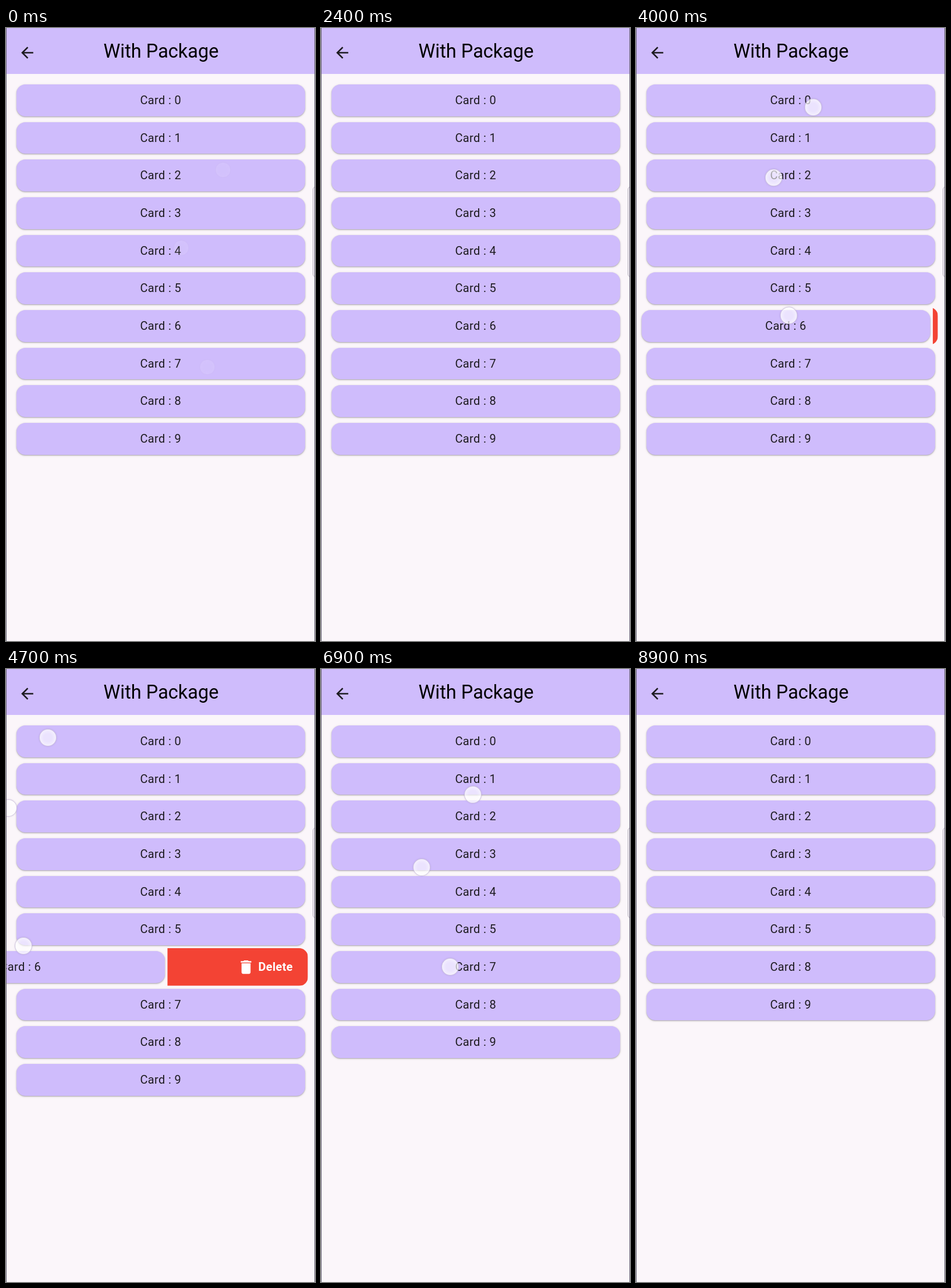
Write an HTML page that moves like this. It is 531 px wide and 1054 px high and loops after 9 s.

```html
<!DOCTYPE html>
<html lang="en">
<head>
<meta charset="utf-8">
<title>With Package</title>
<style>
  html, body { margin: 0; width: 100%; height: 100%; overflow: hidden; }
  #stage {
    position: relative; width: 531px; height: 1054px; overflow: hidden;
    background: #fbf6fa; color: #1d1b20;
    font: 20px/26px Roboto, sans-serif; letter-spacing: .35px;
  }
  #stage::after {
    content: ""; position: absolute; inset: 0; pointer-events: none;
    border: solid #6c667a; border-width: 0 1px;
  }
  header { position: absolute; width: 100%; height: 78.5px; background: #cfbcfc; }
  h1 {
    position: absolute; left: 1px; top: 20px; width: 100%; margin: 0;
    font: 32.5px/40px Roboto, sans-serif; letter-spacing: 0; text-align: center; color: #000;
  }
  svg { width: 31px; height: 31px; fill: currentColor; }
  header svg { position: absolute; left: 20.5px; top: 27px; }
  #list { position: absolute; left: 13px; top: 92px; width: 505.5px; }
  .row { position: relative; height: 64.67px; }
  .card {
    position: absolute; left: 5px; right: 5px; top: 5px; height: 54.7px;
    border-radius: 15.5px; background: #cfbcfc; text-align: center; line-height: 54px;
    box-shadow: 0 1px 2px rgba(0,0,0,.26), 0 1px 4px rgba(0,0,0,.12);
  }
  .action {
    position: absolute; left: 0; right: 0; top: 50%; height: 64.67px; margin-top: -32.33px;
    box-sizing: border-box; padding: 0 25.5px; border-radius: 15.5px;
    display: flex; align-items: center; gap: 5.5px; color: #fff; font-weight: 700;
  }
  .edit { background: #4bae4f; }
  .delete { background: #f34334; justify-content: flex-end; }
  .dot {
    position: absolute; left: -15px; top: -15px; width: 30px; height: 30px;
    box-sizing: border-box; border-radius: 50%; border: 1.5px solid rgba(145,125,180,.42);
    background: radial-gradient(rgba(255,255,255,.58) 35%, rgba(255,255,255,.8) 75%);
    box-shadow: 0 0 3px rgba(100,80,140,.2);
  }
  #edge {
    position: absolute; left: 527px; top: 272px; width: 12px; height: 155px;
    border: 1px solid #b9b4bf; border-radius: 6px; background: #f1edf3;
  }
</style>
</head>
<body>
<div id="stage">
  <header>
    <svg viewBox="0 0 24 24"><path d="M20 11H7.83l5.59-5.59L12 4l-8 8 8 8 1.41-1.41L7.83 13H20z"/></svg>
    <h1>With Package</h1>
  </header>
  <div id="list"></div>
  <div id="edge"></div>
</div>
<script>
const LOOP = 9000, STEP = 100;
const WIDTH = 505.5, ROW = 64.67;
const SLIDE = 200, FADE = 200, PAUSE = 120, COLLAPSE = 180;

// path: [ms, x, y] of the lowest finger; others: offsets of the other two fingers;
// target: where the card settles after release
const drags = [
  { row: 6, target: 0, others: [[-45, -205], [27, -339]],
    path: [[-175, 346, 583]] },
  { row: 6, target: 0, others: [[-28, -220], [35, -350]],
    path: [[400, 269.5, 520], [850, 380, 512], [1500, 241, 506], [1700, 185, 503], [1850, 205, 503]] },
  { row: 6, target: 0, others: [[-4, -214], [51, -340]],
    path: [[3000, 240, 502], [3300, 279, 496], [3500, 325, 494], [3700, 270, 495]] },
  { row: 6, target: -WIDTH, others: [[-26, -237], [42, -358]],
    path: [[3900, 271, 495], [4700, 30, 476], [5200, 42, 478], [5700, 28, 480]] },
  { row: 7, target: WIDTH, others: [[-49, -171], [39, -296]],
    path: [[6900, 222, 512], [7700, 451, 500], [7850, 480, 498]] },
];

const clamp = v => Math.min(1, Math.max(0, v));
const easeOut = u => 1 - (1 - u) ** 2;
const easeInOut = u => u * u * (3 - 2 * u);

function element(parent, className, html = "") {
  const el = document.createElement("div");
  el.className = className;
  el.innerHTML = html;
  return parent.appendChild(el);
}

const icon = d => `<svg viewBox="0 0 24 24"><path d="${d}"/></svg>`;
const pencil = icon("M3 17.25V21h3.75L17.81 9.94l-3.75-3.75zM20.71 7.04c.39-.39.39-1.02 0-1.41l-2.34-2.34c-.39-.39-1.02-.39-1.41 0l-1.83 1.83 3.75 3.75z");
const bin = icon("M6 19c0 1.1.9 2 2 2h8c1.1 0 2-.9 2-2V7H6zM19 4h-3.5l-1-1h-5l-1 1H5v2h14z");

const stage = document.getElementById("stage");
const list = document.getElementById("list");
const rows = Array.from({ length: 10 }, (_, i) => {
  const el = element(list, "row");
  return {
    el,
    edit: element(el, "action edit", pencil + "<span>Edit</span>"),
    remove: element(el, "action delete", bin + "<span>Delete</span>"),
    card: element(el, "card", "Card : " + i),
  };
});
const dots = [0, 1, 2].map(() => element(stage, "dot"));

// Smooth curve through the path points, at rest at both ends
function pointAt(path, t) {
  const last = path.length - 1;
  if (t <= path[0][0]) return path[0].slice(1);
  if (t >= path[last][0]) return path[last].slice(1);
  const i = path.findIndex(p => p[0] > t) - 1;
  const span = path[i + 1][0] - path[i][0], u = (t - path[i][0]) / span;
  const slope = (k, axis) => k === 0 || k === last ? 0 :
    (path[k + 1][axis] - path[k - 1][axis]) / (path[k + 1][0] - path[k - 1][0]);
  return [1, 2].map(axis =>
    path[i][axis] + (path[i + 1][axis] - path[i][axis]) * easeInOut(u) +
    span * u * (1 - u) * ((1 - u) * slope(i, axis) - u * slope(i + 1, axis)));
}

const releaseTime = drag => drag.path.at(-1)[0];

function cardOffset(drag, t) {
  const dragged = pointAt(drag.path, t)[0] - drag.path[0][1];
  const settle = easeOut(clamp((t - releaseTime(drag)) / SLIDE));
  return dragged + (drag.target - dragged) * settle;
}

function drawRow(row, index, t) {
  const own = drags.filter(d => d.row === index);
  const offset = own.reduce((sum, d) => sum + cardOffset(d, t), 0);
  const dismissal = own.find(d => d.target);
  const since = dismissal ? t - releaseTime(dismissal) - SLIDE : -1;
  const gone = since >= 0;
  row.card.style.display = gone ? "none" : "";
  row.card.style.transform = `translateX(${offset}px)`;
  row.edit.style.clipPath = `inset(0 ${WIDTH - Math.max(0, offset)}px 0 0)`;
  row.remove.style.clipPath = `inset(0 0 0 ${WIDTH + Math.min(0, offset)}px)`;
  row.el.style.overflow = gone ? "hidden" : "";
  row.el.style.height = ROW * (1 - easeInOut(clamp((since - PAUSE) / COLLAPSE))) + "px";
}

function drawDots(t) {
  const drag = drags.findLast(d => t >= d.path[0][0]);
  const [x, y] = pointAt(drag.path, t);
  const opacity = clamp(1 - (t - releaseTime(drag)) / FADE);
  [[0, 0], ...drag.others].forEach(([dx, dy], i) => {
    dots[i].style.opacity = opacity;
    dots[i].style.transform = `translate(${x + dx}px, ${y + dy}px) scale(${.86 + .14 * opacity})`;
  });
}

const start = performance.now();
function frame() {
  const elapsed = Math.max(0, performance.now() - start) % LOOP;
  const t = Math.floor(elapsed / STEP) * STEP;
  rows.forEach((row, i) => drawRow(row, i, t));
  drawDots(t);
  requestAnimationFrame(frame);
}
frame();
</script>
</body>
</html>
```
